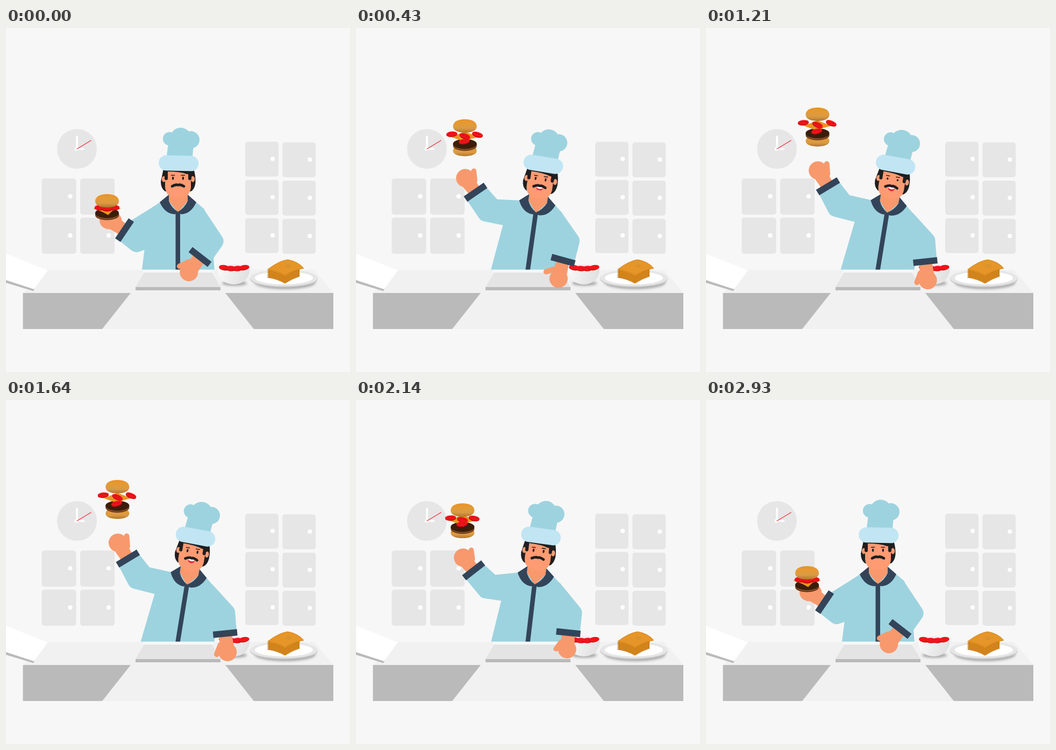
An HTML page with a canvas that plays this animation: 640 by 640 pixels, repeating every 3000 ms.

```html
<!DOCTYPE html>
<html lang="en">
<head>
<meta charset="utf-8">
<title>Chef tossing a burger</title>
<style>
  html, body { margin: 0; width: 100%; height: 100%; overflow: hidden; background: #f7f7f7; }
  canvas { display: block; width: 640px; height: 640px; }
</style>
</head>
<body>
<canvas id="stage" width="640" height="640"></canvas>
<script>
const ctx = document.getElementById('stage').getContext('2d');
const LOOP = 3000, STEPS = 42, RAD = Math.PI / 180;
const SHIRT = '#9dd3df', BRIM = '#c1e5f3', NAVY = '#334459', SKIN = '#f7996d', FACE = '#ff9b73',
      HAIR = '#1f1f1f', RED = '#ef151a', PALE = '#e6e6e6', GREY = '#bababa', TOP = '#f1f1f1';

const RISE = 1300, FALL = 1500, LAND = 2860;
const clamp = v => Math.min(1, Math.max(0, v));
const ramp = (t, from, to) => {
  const u = clamp((t - from) / (to - from));
  return u * u * (3 - 2 * u);
};
const mix = (a, b, u) => a + (b - a) * u;
const mixPoint = (a, b, u) => a.map((v, i) => mix(v, b[i], u));

// Height of the toss: a fast throw that hangs, then a late, soft fall.
function toss(t) {
  if (t < FALL) return 1 - (1 - clamp(t / RISE)) ** 5;
  return 1 - ramp(clamp((t - FALL) / (LAND - FALL)) ** 1.42, 0, 1);
}

// The resting arm swings out later than the throw and returns with it.
const sway = t => t < FALL ? ramp(t, 0, 840) : toss(t);
const smile = t => ramp(t, 250, 500) * (1 - ramp(t, 1650, 2000));
const blink = t => clamp(1 - Math.abs(t - 1210) / 110);
const foreshorten = u => 1 - .6 * u * (1 - u);

function fill(path, color) { ctx.fillStyle = color; ctx.fill(new Path2D(path)); }
function poly(color, ...points) { fill('M' + points.join('L') + 'Z', color); }
function rect(x, y, w, h, r, color) {
  ctx.fillStyle = color;
  ctx.beginPath();
  ctx.roundRect(x, y, w, h, r);
  ctx.fill();
}
function oval(x, y, rx, ry, color, angle = 0) {
  ctx.fillStyle = color;
  ctx.beginPath();
  ctx.ellipse(x, y, rx, ry, angle * RAD, 0, 7);
  ctx.fill();
}
function stroke(path, color, width, cap = 'round') {
  ctx.strokeStyle = color;
  ctx.lineWidth = width;
  ctx.lineCap = cap;
  ctx.lineJoin = 'round';
  ctx.stroke(new Path2D(path));
}
function at(x, y, angle, draw) {
  ctx.save();
  ctx.translate(x, y);
  ctx.rotate(angle * RAD);
  draw();
  ctx.restore();
}
function gradient(x0, y0, x1, y1, ...colors) {
  const g = ctx.createLinearGradient(x0, y0, x1, y1);
  colors.forEach((c, i) => g.addColorStop(i / (colors.length - 1), c));
  return g;
}
function turn([x, y], angle) {
  const c = Math.cos(angle * RAD), s = Math.sin(angle * RAD);
  return [x * c - y * s, x * s + y * c];
}
function lean(x, y, angle) {
  const [dx, dy] = turn([x - 320, y - 449], angle);
  return [320 + dx, 449 + dy];
}

function cupboards(x, y, w, h, rows, gapX, gapY, drop, knob) {
  for (let i = 0; i < rows * 2; i++) {
    const col = i % 2, left = x + col * gapX, top = y + (i >> 1) * gapY + col * drop;
    rect(left, top, w, h, 5, PALE);
    oval(left + w - 11, top + h / 2 - .5, knob, knob, '#fff');
  }
}

function room() {
  ctx.fillStyle = '#f7f7f7';
  ctx.fillRect(0, 0, 640, 640);
  cupboards(66.5, 280, 64, 67.3, 2, 71.5, 72.8, 0, 4.2);
  cupboards(445, 211.6, 62, 65, 3, 69.3, 71.1, 1.2, 4);
  oval(132, 225, 37, 37, PALE);
  stroke('M132 202V224M132 225H144.5', '#fff', 3.6);
  oval(131, 225, 3.4, 3.4, '#fff');
  oval(131, 225, 1.4, 1.4, PALE);
  stroke('M132 225L158.5 209', '#f52331', 1.1, 'butt');
}

function counter() {
  poly(TOP, [78, 450], [573, 450], [609, 493], [32, 493]);
  rect(31.5, 493, 577.5, 67, 0, GREY);
  poly(TOP, [232, 493], [408, 493], [461, 560], [179, 560]);
  poly(GREY, [0, 467], [54, 483], [51, 489.5], [0, 474]);
  poly('#fff', [0, 420], [78, 451], [52, 486], [0, 469]);
  poly('#f7f7f7', [253, 450], [388, 450], [384, 455], [256, 455]);
  poly('#e4e4e4', [257, 455], [383, 455], [399, 482], [241, 482]);
  rect(241, 482, 158, 6, 0, GREY);
}

function shadow(x, y, rx, ry) {
  ctx.save();
  ctx.filter = 'blur(2px)';
  oval(x, y, rx, ry, '#aaa');
  ctx.restore();
}

function bowl() {
  shadow(425, 475, 23, 4.5);
  oval(423.7, 446, 29.5, 6.5, '#ededed');
  for (let i = 0; i < 4; i++) {
    const x = 406 + i * 12.3, y = 448.5 - Math.abs(x - 424) / 8, tilt = (424 - x) / 2;
    oval(x, y, 9.8, 4.8, '#c90f14', tilt);
    oval(x, y - .8, 9.6, 4.4, RED, tilt);
  }
  fill('M394 445Q400 453.5 424 453.5T453.5 445Q454 461 444 470Q436 477 424 477T403 470Q394 461 394 445Z',
    gradient(394, 450, 454, 470, '#fafafa', '#ebebeb', '#dedede'));
}

function plate() {
  shadow(519, 473, 57, 13);
  oval(517, 467, 63, 15.5, '#c9c9c9');
  oval(517, 465, 63, 15.5, PALE);
  oval(517, 465, 54, 12, '#fff');
  for (let y = 15; y >= 0; y -= 3) {
    const right = y ? 546 : 554;
    const slice = `M487 ${449 + y}Q506 ${452 + y} 519 ${460 + y}Q533 ${451 + y} ${right} ${447 + y}` +
      `Q543 ${434 + y} 524 ${431 + y}Q508 ${433 + y} 487 ${449 + y}Z`;
    fill(slice, y ? '#e08f22' : '#e69528');
    stroke(slice, y ? '#b0690d' : '#cf841d', .9);
  }
  oval(525, 443, 5, 3, '#d8932f');
}

function bun(x, y, h) {
  at(x, y, 0, () => {
    ctx.scale(1, h / 25);
    fill('M-22 1C-22-9-11-12.5 0-12.5S22-9 22 1C22 9 11 12.5 0 12.5S-22 9-22 1Z',
      gradient(0, -12.5, 0, 12.5, '#e8932a', '#e59a33', '#d99b45', '#b3752a'));
  });
}

function tomato(x, y, angle) {
  at(x, y, angle, () => {
    oval(0, .8, 10.3, 4.7, '#c80c12');
    oval(0, -.5, 10.2, 4.2, RED);
    stroke('M-5-1H-2M2-1H5', '#d30d13', 1.6);
  });
}

function burger(p) {
  const open = p ** 1.2, spin = p * p, x = 188 + 19.5 * spin, top = 309 - 161 * p;
  const y = (closed, apart) => top + mix(closed, apart, open);
  bun(x, y(38, 62), 21);
  const patty = y(35, 47.5);
  oval(x, patty + 4.2, 22, 9, '#5f2e14');
  oval(x, patty + 2.4, 22, 9, '#a0673a');
  oval(x, patty + 1.2, 22, 9, '#4a230e');
  oval(x, patty, 22, 8.6, '#3b1d0a');
  const cheese = y(27, 34);
  fill(`M${x - 25.5} ${cheese}L${x} ${cheese - 10}L${x + 26} ${cheese}L${x + 10} ${cheese + 4}` +
    `L${x + 2} ${cheese + 12}L${x - 9} ${cheese + 6}Z`, '#e8951f');
  tomato(x - mix(13, 26.5, open), y(25, 28), -6 * spin);
  tomato(x + mix(13, 25.5, open), y(25, 29), 22 * spin);
  tomato(x, y(27, 32), 24 * spin);
  tomato(x - 1.5 * open, y(26, 44), -14 * spin);
  bun(x, top + 12.5, 25);
}

function hand(x, y, angle, reach, spread = 0) {
  at(x, y, angle, () => {
    ctx.scale(1, reach);
    poly(SKIN, [-12, 0], [-14, -28], [13, -28], [11, 0]);
    oval(-1, -35, 17, 17 / reach, SKIN);
    stroke(`M11-20L${19.5 + 15 * spread} ${-37 + 24 * spread}`, SKIN, 10);
  });
}
function cuff(x, y, angle) {
  at(x, y, angle, () => rect(-22.5, -6, 45, 12, 0, NAVY));
}
function cuffEnds(x, y, angle) {
  const [dx, dy] = turn([21.5, 0], angle);
  return [[x + dx, y + dy], [x - dx, y - dy]];
}

// The elbow is the one rounded corner between the points before and after it.
function sleeve(before, elbow, after) {
  ctx.fillStyle = SHIRT;
  ctx.beginPath();
  before.forEach(q => ctx.lineTo(...q));
  ctx.arcTo(...elbow, ...after[0], 15);
  after.forEach(q => ctx.lineTo(...q));
  ctx.fill();
}

function leftArm(p, tilt) {
  const swing = 32 * p * (1 - p), angle = mix(-56, -31, p);
  const x = mix(220.5, 227, p) - swing, y = mix(376, 294.5, p);
  const crook = [mix(262, 267, p) - swing, mix(340, 311, p) + swing];
  const elbow = mixPoint([240, 419], [231, 349], p), armpit = mixPoint([268, 409], [278, 361], p);
  const [right, left] = cuffEnds(x, y, angle);
  hand(x, y, angle, foreshorten(p));
  sleeve([lean(310, 350, tilt), lean(287, 324, tilt), crook, right, left], elbow, [armpit]);
  cuff(x, y, angle);
}

function rightArm(t, p, tilt) {
  const q = sway(t), lag = p - q, angle = mix(38, -6, q);
  const [x, y] = mixPoint([361, 426 + 14 * q * (1 - q)], [408, 434.5], q);
  const elbow = mixPoint([408, 397], [426, 389], q);
  const [right, left] = cuffEnds(x, y, angle);
  hand(x, y, angle + 180, foreshorten(q) + .45 * lag, lag);
  sleeve([lean(350, 370, tilt), lean(366, 334, tilt)], elbow, [right, left]);
  cuff(x, y, angle);
}

function torso() {
  poly(SHIRT, [251, 465], [263, 369], [285, 325], [310, 312], [332, 312], [355, 325], [369, 337], [384, 400], [389, 465]);
}

function collar() {
  rect(315.5, 342, 8.5, 125, 0, NAVY);
  poly(SKIN, [303, 300], [338, 300], [338, 322], [320, 343], [303, 322]);
  fill('M303 310L286 324Q295 345 313 346.5Q318 346 320 342Q308 335 303 322Z', NAVY);
  fill('M338 310L354 324Q345 345 327 346.5Q322 346 320 342Q332 335 338 322Z', NAVY);
}

function head(t) {
  fill('M293 262H349Q353 274 352.5 288Q351 300 344 304H296Q288 298 288 286Z', HAIR);
  for (const side of [-1, 1]) oval(320.5 + 27 * side, 281, 3.6, 5.5, FACE);
  fill('M296 262H344V297Q342 316 320 316T296 297Z', FACE);
  fill('M297 262H346V271L337 272Q324 267 300 267Z', HAIR);
  stroke('M298 264V280M342 264V280', HAIR, 6);
  stroke('M307.5 274H313.5M326 274H332.5', HAIR, 1.6);
  for (const side of [-1, 1]) oval(320 + 9.4 * side, 279.5, 1.7, 3 - 1.2 * blink(t), HAIR);
  const grin = smile(t);
  if (grin > 0) {
    oval(320.5, 297, 6, 4.5 * grin, '#f0283c');
    oval(320.5, 295.5, 5.5, 2.4 * Math.sqrt(grin), '#fff');
  }
  stroke('M309 294.5Q313 292 317.5 291.5Q320 293 322.5 291.5Q327 292 331 294.5', HAIR, 4.8);

  oval(304.5, 206, 12.6, 12.6, SHIRT);
  oval(325, 205, 19.5, 19.5, SHIRT);
  oval(344, 208, 16, 16, SHIRT);
  poly(SHIRT, [303, 206], [298.5, 242], [346.5, 244], [349.5, 212]);
  at(321.2, 251.5, 1.3, () => rect(-37, -14.3, 74, 28.6, 14, BRIM));
}

function draw(t) {
  const p = toss(t), tilt = 9.2 * p;
  const leaning = part => at(320, 449, tilt, () => { ctx.translate(-320, -449); part(); });
  room();
  counter();
  ctx.save();
  ctx.beginPath();
  ctx.rect(0, 0, 640, 449.5);
  ctx.clip();
  leaning(torso);
  leftArm(p, tilt);
  leaning(collar);
  leaning(() => head(t));
  ctx.restore();
  burger(p);
  bowl();
  plate();
  rightArm(t, p, tilt);
}

const start = performance.now();
function tick() {
  const elapsed = (performance.now() - start) % LOOP;
  const step = Math.floor((elapsed + 5) * STEPS / LOOP) % STEPS;
  draw(step * LOOP / STEPS);
  requestAnimationFrame(tick);
}
tick();
</script>
</body>
</html>
```
